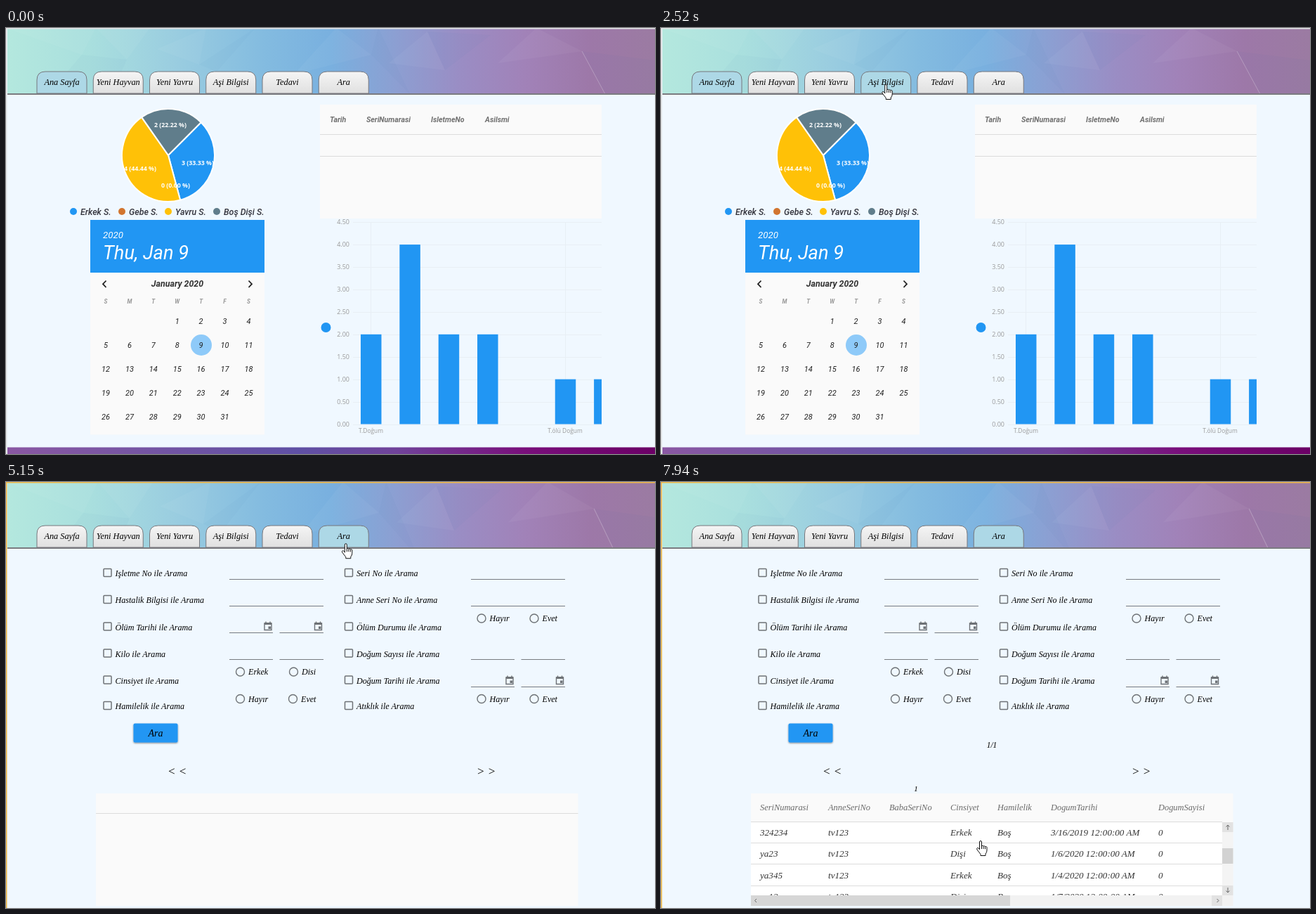
Write an HTML page that moves like this. It is 924 px wide and 606 px high and loops after 7.99 s.

```html
<!DOCTYPE html>
<html lang="tr">
<head>
<meta charset="utf-8">
<style>
html, body { margin: 0; width: 100%; height: 100%; overflow: hidden; background: #f0f8ff; }
svg { display: block; width: 924px; height: 606px; }
text { white-space: pre; }
.serif { font-family: "Liberation Serif", serif; font-style: italic; }
.roboto { font-family: Roboto, sans-serif; font-style: italic; }
.sans { font-family: "Open Sans", sans-serif; }
.mid { text-anchor: middle; }
.end { text-anchor: end; }
.medium { font-weight: 500; }
.bold { font-weight: 700; }
</style>
</head>
<body>
<svg id="stage" viewBox="0 0 924 606"></svg>
<script>
const LOOP = 7990, BLUE = '#2196f3';
const PAGE_SWITCH = 3950, RESULTS = 7100, SCROLL = 7940;
const $ = id => document.getElementById(id);

const rect = (x, y, w, h, fill, extra = '') =>
  `<rect x="${x}" y="${y}" width="${w}" height="${h}" fill="${fill}" ${extra}/>`;
const circle = (x, y, r, fill, extra = '') => `<circle cx="${x}" cy="${y}" r="${r}" fill="${fill}" ${extra}/>`;
const path = (d, extra) => `<path d="${d}" ${extra}/>`;
// y is the middle of the line of text
const text = (x, y, s, size, cls = '', fill = '#000') =>
  `<text x="${x}" y="${y + size * .35}" font-size="${size}" class="${cls}" fill="${fill}">${s.replace(/</g, '&lt;')}</text>`;
const group = (id, cls, ...parts) => `<g id="${id}" class="${cls}">${parts.flat().join('')}</g>`;
const range = (n, f) => Array.from({ length: n }, (_, i) => f(i));
const gradient = (id, stops, dir = '') => `<linearGradient id="${id}" ${dir}>` +
  stops.map(([o, c]) => `<stop offset="${o}" stop-color="${c}"/>`).join('') + '</linearGradient>';

const defs = `<defs>
  ${gradient('sky', [[0, '#b4e8de'], [.13, '#a9dfde'], [.26, '#9acde0'], [.4, '#83bbe0'], [.5, '#79b0df'],
    [.6, '#8c9fd2'], [.7, '#9a8dc4'], [.8, '#a182b8'], [.9, '#9d78a8'], [1, '#9b7ba2']])}
  ${gradient('strip', [[0, '#8a58a3'], [.2, '#7655a3'], [.45, '#5f50a4'], [.6, '#70439a'], [.8, '#790f7b'], [1, '#6b0066']])}
  ${gradient('tab', [[0, '#f5f5f5'], [1, '#e0e0e0']], 'x2="0" y2="1"')}
  <clipPath id="headClip">${rect(2, 1, 922, 93, '#000')}</clipPath>
  <clipPath id="chartClip">${rect(440, 265, 408, 320, '#000')}</clipPath>
  <clipPath id="rowClip">${rect(128, 485, 671, 103, '#000')}</clipPath>
  <clipPath id="buttonClip">${rect(182, 344, 62, 27, '#000', 'rx="2"')}</clipPath>
  <filter id="shadow" x="-20%" y="-20%" width="140%" height="160%">
    <feDropShadow dx="0" dy="1" stdDeviation="1.2" flood-opacity=".5"/></filter>
</defs>`;

// Header
const lightFacets = 'M0 0L128 0L108 38ZM205 0L172 45L128 0ZM285 0L275 52L215 30Z' +
  'M410 66L470 0L520 38ZM545 50L600 5L625 60ZM755 0L820 33L700 50Z';
const darkFacets = 'M108 38L172 45L150 94L60 94ZM300 62L355 0L275 52Z' +
  'M530 0L575 94L520 38ZM625 60L690 10L600 5ZM820 33L924 46L924 94L853 94Z';
const header = `<g clip-path="url(#headClip)">` + rect(0, 0, 924, 94, 'url(#sky)') +
  group('facets', '',
    path(lightFacets, 'fill="#fff" fill-opacity=".04"'),
    path(darkFacets, 'fill="#3060a0" fill-opacity=".03"'),
    path('M820 33L853 94', 'stroke="#fff" stroke-opacity=".25"')) + '</g>' +
  rect(2, 93, 922, 2, '#7b7b80');

const TABS = ['Ana Sayfa', 'Yeni Hayvan', 'Yeni Yavru', 'Aşi Bilgisi', 'Tedavi', 'Ara'];
const tabX = i => 44 + i * 80.25;
const tabs = group('tabs', 'serif mid', TABS.map((name, i) => {
  const x = tabX(i);
  return path(`M${x} 93V74Q${x} 62 ${x + 12} 62H${x + 59}Q${x + 71} 62 ${x + 71} 74V93Z`,
    `id="tab${i}" stroke="#77777c"`) + text(x + 35.5, 77, name, 12.3);
}));

// Home page
const onPie = deg => {
  const a = deg * Math.PI / 180;
  return `${231 + 66 * Math.sin(a)} ${181 - 66 * Math.cos(a)}`;
};
const slice = (from, to, fill) =>
  path(`M231 181L${onPie(from)}A66 66 0 0 1 ${onPie(to)}Z`, `fill="${fill}" stroke="#fff" stroke-width="2"`);
const pie = group('pie', 'sans mid bold',
  slice(45, 165, BLUE), slice(165, 325, '#ffc107'), slice(325, 405, '#607d8b'),
  [[234, 138, '2 (22.22 %)'], [273, 192, '3 (33.33 %)'], [191, 200, '4 (44.44 %)'], [241.5, 224, '0 (0.00 %)']]
    .map(([x, y, s]) => text(x, y, s, 8.8, '', '#fff')));
const legend = group('legend', 'roboto',
  [[96, 'Erkek S.', BLUE], [165, 'Gebe S.', '#d2752f'], [231, 'Yavru S.', '#ffc107'], [300, 'Boş Dişi S.', '#607d8b']]
    .map(([x, s, c]) => circle(x, 261, 5, c) + text(x + 10, 261.5, s, 12.4, 'medium', '#33333c')));

const dayX = c => 142 + 33.9 * c;
const calendar = group('calendar', 'roboto',
  rect(120, 273, 248, 75, BLUE), rect(120, 348, 248, 230.5, '#fafafa'),
  text(138, 294, '2020', 13.3, '', '#fff'), text(138, 319, 'Thu, Jan 9', 27.3, '', '#fff'),
  text(244, 364, 'January 2020', 12.4, 'mid bold', '#333'),
  path('M142.500 359.500L138 364.200L142.500 369M345.500 359.500L350 364.200L345.500 369',
    'fill="none" stroke="#222" stroke-width="1.8"'),
  [...'SMTWTFS'].map((d, c) => text(dayX(c), 389.5, d, 8.2, 'mid bold', '#999')),
  circle(278, 451, 15, '#8ecaf9'),
  range(31, i => text(dayX((i + 3) % 7), 417 + 34 * Math.floor((i + 3) / 7), `${i + 1}`, 11, 'mid', '#222')));

const emptyTable = group('vaccines', 'roboto',
  rect(447, 109, 401, 162, '#fafafa'), rect(447, 151, 401, 1, '#dcdcdc'), rect(447, 182, 401, 1, '#dcdcdc'),
  [[461, 'Tarih'], [513, 'SeriNumarasi'], [605, 'IsletmeNo'], [682, 'Asilsmi']]
    .map(([x, s]) => text(x, 130.5, s, 10.6, 'bold', '#707070')));

const valueY = v => 563.5 - v * 63.85;
const chart = `<g clip-path="url(#chartClip)" class="sans">` +
  range(10, i => rect(494, Math.round(valueY(i / 2)), 354, 1, '#e8eff5') +
    text(489, valueY(i / 2), (i / 2).toFixed(2), 9, 'end', '#999')).join('') +
  [519, 796].map(x => rect(x, 276, 1, 288, '#e8eff5')).join('') +
  [2, 4, 2, 2, 0, 1, 1].map((v, i) =>
    rect(505 + 55.35 * i, valueY(v), 29.5, v * 63.85, BLUE, `id="bar${i}"`)).join('') +
  text(519.5, 573.5, 'T.Doğum', 8.4, 'mid', '#999') + text(796, 573.5, 'T.ölü Doğum', 8.4, 'mid', '#999') +
  circle(455.5, 426, 7, BLUE) + '</g>';
const tooltip = group('tooltip', 'roboto',
  rect(579, 313, 71, 42, '#fafafa', 'rx="2" fill-opacity=".82" stroke="#ddd" stroke-opacity=".4"'),
  text(588, 324.5, 'T.yavru S.', 12, 'bold', '#333'), circle(598, 341, 7, BLUE),
  text(613, 341.5, '4.00', 12.4, 'bold', '#333'));
const home = group('home', '', pie, legend, calendar, emptyTable, chart, tooltip, rect(2, 596.5, 922, 10, 'url(#strip)'));

// Search page
const GRAY = '#6e7276';
const check = (x, y, label) =>
  rect(x, y - 5.5, 11, 11, 'none', `rx="1" stroke="${GRAY}" stroke-width="1.5"`) + text(x + 16.5, y + .8, label, 12.1);
const radio = (x, y, label) =>
  circle(x, y, 6, 'none', `stroke="${GRAY}" stroke-width="1.4"`) + text(x + 11.5, y, label, 12.1);
const underline = (x, y, w) => rect(x, y, w, 1, '#777b80');
const pair = (x, y) => underline(x, y, 62) + underline(x + 71.5, y, 62.5);
const dateIcon = (x, y) =>
  path(`M${x - 5} ${y - 4}h10v9.500h-10zM${x - 3} ${y - 6.5}v3M${x + 3} ${y - 6.5}v3`,
    `fill="none" stroke="${GRAY}" stroke-width="1.4"`) +
  rect(x - 5, y - 5, 10, 3, GRAY) + rect(x + .5, y + .5, 3.5, 3.5, GRAY);
const dates = (x, y) => pair(x, y + 9) + dateIcon(x + 55, y) + dateIcon(x + 126.500, y);
const choice = (x, y, a, b, gap = 75) => radio(x, y, a) + radio(x + gap, y, b);

const ROW_Y = [129, 167, 205.5, 243.5, 281.5, 318];
const LEFT = ['Işletme No', 'Hastalik Bilgisi', 'Ölüm Tarihi', 'Kilo', 'Cinsiyet', 'Hamilelik'];
const RIGHT = ['Seri No', 'Anne Seri No', 'Ölüm Durumu', 'Doğum Sayısı', 'Doğum Tarihi', 'Atıklık'];
const form = [
  ROW_Y.map((y, i) => check(139, y, LEFT[i] + ' ile Arama') + check(482.5, y, RIGHT[i] + ' ile Arama')).join(''),
  [318, 662].map(x => underline(x, 138, 134) + underline(x, 176, 134) + pair(x, 252)).join(''),
  dates(318, 205), dates(662, 282),
  choice(333.5, 270, 'Erkek', 'Disi', 76), choice(333.5, 308.5, 'Hayır', 'Evet'),
  choice(677, 194, 'Hayır', 'Evet'), choice(677, 308.5, 'Hayır', 'Evet'),
  rect(181.5, 343.5, 63, 27, BLUE, 'rx="2" filter="url(#shadow)"'),
  `<g clip-path="url(#buttonClip)">${circle(214, 364, 0, '#fff', 'id="ripple"')}</g>`,
  text(213, 357.5, 'Ara', 14, 'mid'),
  text(230, 411, '< <', 17), text(670, 411, '> >', 17),
  rect(128, 443, 686.5, 160, '#fafafa')
];

const COLS = [141, 238, 325, 412, 479, 555, 708];
const HEADS = ['SeriNumarasi', 'AnneSeriNo', 'BabaSeriNo', 'Cinsiyet', 'Hamilelik', 'DogumTarihi', 'DogumSayisi'];
const ANIMALS = [
  ['123456', 'Dişi', '5/10/2018'], ['tv123', 'Dişi', '3/12/2018'], ['234123', 'Erkek', '2/16/2019'],
  ['324234', 'Erkek', '3/16/2019'], ['ya23', 'Dişi', '1/6/2020'], ['ya345', 'Erkek', '1/4/2020'], ['ya12', 'Dişi', '1/7/2020']
];
const rows = ANIMALS.map(([id, sex, born], i) => {
  const y = 499 + 30.2 * i;
  return [id, 'tv123', '', sex, 'Boş', born + ' 12:00:00 AM', '0']
    .map((s, c) => text(COLS[c], y, s, 13.1, '', '#333')).join('') + rect(128, Math.round(y + 14.5), 671, 1, '#dcdcdc');
});
const results = group('results', '',
  text(471, 374, '1/1', 11.5, 'mid'), text(363, 436, '1', 11, 'mid'),
  HEADS.map((s, c) => text(COLS[c], 463, s, 12.4, '', '#6a6a6a')),
  rect(128, 484, 671, 104, '#fff'), rect(128, 483, 671, 1, '#dcdcdc'),
  `<g clip-path="url(#rowClip)">${group('rows', '', rows)}</g>`,
  rect(799, 484, 15.5, 104, '#f4f4f4'), rect(799, 484, 15.5, 14, '#e2e2e2'), rect(799, 574, 15.5, 14, '#e2e2e2'),
  rect(799, 499, 15.5, 22, '#d2d2d2', 'id="thumb"'),
  rect(128, 588, 686.5, 15, '#f2f2f2'), rect(128, 588, 369, 15, '#d6d6d6'), rect(784, 588, 15, 15, '#e2e2e2'),
  path('M804.500 490.500l2.500-2.500l2.500 2.500M807 488v7M804.500 581.500l2.500 2.500l2.500-2.500M807 584v-7' +
    'M136 593l-2.500 2.500l2.500 2.500M791.500 593l2.500 2.500l-2.500 2.500', 'fill="none" stroke="#666"'));
const search = group('search', 'serif', form, rect(128, 471, 686.5, 1, '#dcdcdc', 'id="emptyLine"'), results);

const border = rect(0, 0, 924, 1.5, '#e4e6e8', 'class="edge"') + rect(0, 0, 1.5, 606, '#e4e6e8', 'class="edge"');
const hand = path('M-1.500 13V2a1.500 1.500 0 0 1 3 0V8a1.400 1.400 0 0 1 2.600 .3a1.400 1.400 0 0 1 2.500 .6' +
  'a1.400 1.400 0 0 1 2.400 .9V14q0 3-2 5v2.500H0V19.500L-5 13q-1-2 .5-2.600q1.300-.3 3 2.100Z' +
  'M1.500 8v4M4.100 8.500v3.500M6.600 9.200v3', 'id="hand" fill="#fff" stroke="#111"');

$('stage').innerHTML = defs + rect(0, 0, 924, 606, '#f0f8ff') + header + tabs + home + search + border + hand;

// Pointer: time, x and y of the fingertip
const POINTER = [
  [480, 700, 612], [930, 392, 412], [1230, 232, 207], [1280, 230, 200], [1700, 165, 82], [2070, 214, 86],
  [2520, 320, 80], [2890, 412, 84], [3470, 462, 77], [3690, 464, 77], [4410, 491, 82], [5150, 484, 87],
  [5200, 474, 98], [6030, 232, 330], [6130, 226, 341], [6400, 214, 364], [6840, 216, 360], [7650, 453, 507], [7800, 455, 510]
];
function pointerAt(t) {
  const i = POINTER.findIndex(p => p[0] > t);
  if (i < 0) return POINTER.at(-1).slice(1);
  if (i === 0) return [-50, -50];
  const [t0, x0, y0] = POINTER[i - 1], [t1, x1, y1] = POINTER[i];
  const k = (t - t0) / (t1 - t0);
  return [x0 + (x1 - x0) * k, y0 + (y1 - y0) * k];
}
const show = (id, on) => $(id).setAttribute('display', on ? 'inline' : 'none');
const set = (id, name, value) => $(id).setAttribute(name, value);

function draw(t) {
  const [x, y] = pointerAt(t), searching = t >= PAGE_SWITCH;
  set('hand', 'transform', `translate(${x} ${y})`);
  TABS.forEach((_, i) => {
    const hover = y > 62 && y < 93 && x > tabX(i) && x < tabX(i) + 71;
    set('tab' + i, 'fill', hover || i === (searching ? 5 : 0) ? '#add8e6' : 'url(#tab)');
  });
  show('home', !searching);
  show('search', searching);
  set('facets', 'transform', searching ? 'scale(1.021 1.15)' : '');
  document.querySelectorAll('.edge').forEach(e => e.setAttribute('fill', t < 3200 ? '#e4e6e8' : '#efb94a'));

  show('tooltip', t >= 660 && t < 1650);
  set('bar1', 'fill', t >= 660 && t < 1180 ? '#42a5f5' : BLUE);

  const wave = Math.min(1, Math.max(0, (t - 6450) / 390));
  set('ripple', 'r', 45 * wave);
  set('ripple', 'opacity', .3 * (1 - wave));
  show('results', t >= RESULTS);
  show('emptyLine', t < RESULTS);
  const scrolled = t >= SCROLL;
  set('rows', 'transform', `translate(0 ${scrolled ? -91 : 0})`);
  set('thumb', 'y', scrolled ? 521 : 499);
}
function tick() {
  draw(performance.now() % LOOP);
  requestAnimationFrame(tick);
}
tick();
</script>
</body>
</html>
```
